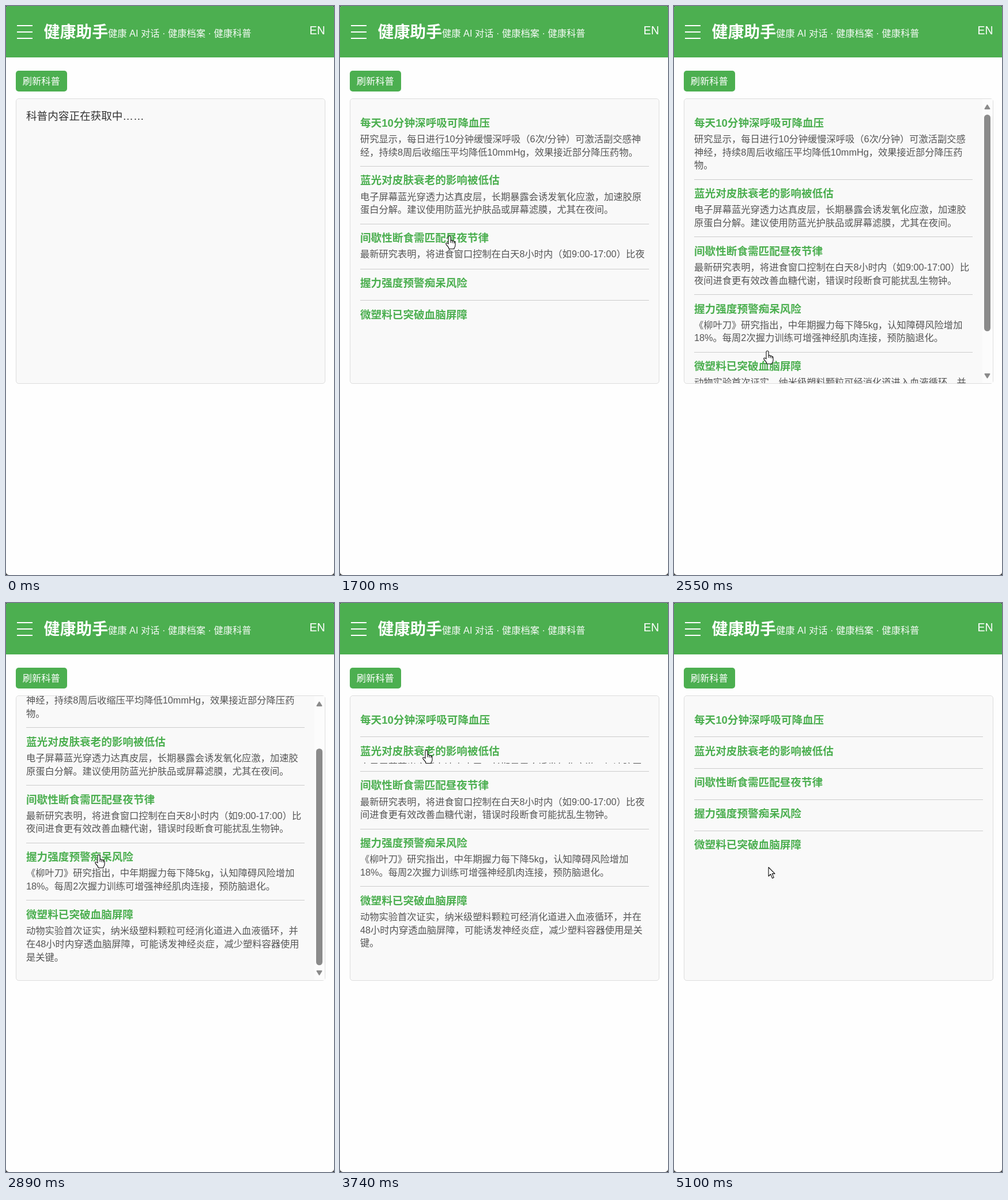
An HTML page that plays this animation: 569x985 px, repeating every 5.44 s.

```html
<!DOCTYPE html>
<html lang="zh-CN">
<head>
<meta charset="utf-8">
<title>健康助手</title>
<style>
html, body { margin: 0; width: 100%; height: 100%; overflow: hidden; background: #333; }
body {
  font: 16.27px/1.4 "Liberation Sans", "Noto Sans CJK SC", "Noto Sans CJK", sans-serif;
  text-spacing-trim: space-all;
  text-autospace: no-autospace;
}
#app { position: absolute; left: 0; top: 0; width: 569px; height: 985px; background: #fefefe; border-radius: 4px 4px 5px 5px; overflow: hidden; }
#app > *, #view > *, .bar, #head > * { position: absolute; white-space: nowrap; }
#head { left: 0; top: 0; width: 569px; height: 89px; background: #4caf50; color: #fff; }
.line { left: 19px; width: 27px; height: 2.6px; background: #fff; }
#name { left: 65.5px; top: 25.5px; font-size: 27.9px; font-weight: bold; }
#sub { left: 177px; top: 36px; opacity: .95; }
#lang { left: 526.5px; top: 29px; font-size: 19.5px; }
#btn { left: 16.5px; top: 112px; width: 89.5px; height: 36px; line-height: 36px; border-radius: 5px; background: #4caf50; color: #fff; text-align: center; }
#box { left: 16.5px; top: 160px; width: 537px; height: 494px; box-sizing: border-box; border: 1px solid #ddd; border-radius: 5px; background: #f9f9f9; }
#view { left: 17px; top: 161px; width: 536px; height: 492px; overflow: hidden; }
#wait { left: 18px; top: 16.500px; font-size: 18.6px; color: #333; }
#list { left: 18px; }
.item { padding: 11.5px 0 12.5px; border-bottom: 1px solid #ccc; }
.item:last-child { border: 0; }
.title { height: 26.04px; font-size: 18.6px; font-weight: bold; color: #4caf50; }
.text { margin-top: 3.1px; overflow: hidden; white-space: normal; color: #555; }
#scroll { right: 0; top: 0; width: 18px; height: 492px; background: #fcfcfc; }
#thumb { left: 3px; width: 11px; border-radius: 6px; background: #8b8b8b; }
#scroll svg { position: absolute; left: 0; top: 0; }
#cursor { left: 0; top: 0; overflow: visible; }
</style>
</head>
<body>
<div id="app">
  <div id="head">
    <div class="line" style="top:32.700px"></div>
    <div class="line" style="top:43.700px"></div>
    <div class="line" style="top:54.700px"></div>
    <div id="name">健康助手</div>
    <div id="sub">健康 AI 对话 · 健康档案 · 健康科普</div>
    <div id="lang">EN</div>
  </div>
  <div id="btn">刷新科普</div>
  <div id="box"></div>
  <div id="view">
    <div id="wait">科普内容正在获取中……</div>
    <div id="list"></div>
    <div id="scroll">
      <svg width="18" height="492" fill="#8b8b8b" stroke="#8b8b8b" stroke-width="2" stroke-linejoin="round">
        <path d="M4.500 17L8.500 10.500L12.500 17z"/>
        <path d="M4.500 476L8.500 482.500L12.500 476z"/>
      </svg>
      <div class="bar" id="thumb"></div>
    </div>
  </div>
  <svg id="cursor" width="1" height="1" fill="#fff" stroke="#111" stroke-width="1.1" stroke-linejoin="round"><path/></svg>
</div>
<script>
const LOOP = 5440, TICK = 170, LINE = 16.27 * 1.4, ROOM = 188.9;
const HAND = 'M-2 14V2a2 2 0 0 1 4 0V8q2.500-1 3 1q2.500-1 3 1q2-.5 2 2v4q0 3-2 5v1.500H-1q0-2.500-3-5.500q-3-3-2-4.500q2-1 4 1.500zM2 8v4M5 9v3.500M8 10v3';
const ARROW = 'M0 0V15.500l3.600-3.500 3 7 2.600-1.200-3-6.700H11z';

// title, text, lines when wide, lines beside the scrollbar, opening time, closing time
const items = [
  ['每天10分钟深呼吸可降血压', '研究显示，每日进行10分钟缓慢深呼吸（6次/分钟）可激活副交感神经，持续8周后收缩压平均降低10mmHg，效果接近部分降压药物。', 2, 3, 600, 3253],
  ['蓝光对皮肤衰老的影响被低估', '电子屏幕蓝光穿透力达真皮层，长期暴露会诱发氧化应激，加速胶原蛋白分解。建议使用防蓝光护肤品或屏幕滤膜，尤其在夜间。', 2, 2, 1110, 3590],
  ['间歇性断食需匹配昼夜节律', '最新研究表明，将进食窗口控制在白天8小时内（如9:00-17:00）比夜间进食更有效改善血糖代谢，错误时段断食可能扰乱生物钟。', 2, 2, 1610, 3760],
  ['握力强度预警痴呆风险', '《柳叶刀》研究指出，中年期握力每下降5kg，认知障碍风险增加18%。每周2次握力训练可增强神经肌肉连接，预防脑退化。', 2, 2, 1950, 4250],
  ['微塑料已突破血脑屏障', '动物实验首次证实，纳米级塑料颗粒可经消化道进入血液循环，并在48小时内穿透血脑屏障，可能诱发神经炎症，减少塑料容器使用是关键。', 3, 3, 2300, 4760]
].map(([title, text, wide, narrow, open, close]) => ({ title, text, wide, narrow, open, close }));

// time, x, y of the pointer tip
const path = [
  [680, 209, 203], [850, 209, 205], [1020, 210, 277], [1190, 206, 300], [1530, 206, 300],
  [1700, 190, 398], [1870, 184, 403], [2040, 170, 499], [2210, 162, 597], [2550, 162, 597],
  [2890, 161, 436], [3060, 157, 207], [3400, 157, 207], [3570, 154, 235], [3740, 150, 255],
  [3910, 147, 305], [4080, 144, 363], [4250, 144, 363], [4420, 146, 385], [4590, 146, 385],
  [4760, 149, 414], [4930, 152, 420], [5100, 164, 457.5]
];
const scrolls = [[2550, 0], [2890, 1], [3060, 0]];

const $ = id => document.getElementById(id);
const clamp = v => Math.max(0, Math.min(1, v));

function add(parent, name, text = '') {
  const el = document.createElement('div');
  el.className = name;
  el.textContent = text;
  return parent.appendChild(el);
}

function along(keys, t, col) {
  const i = keys.findIndex(k => k[0] >= t);
  if (i < 0) return keys[keys.length - 1][col];
  if (i === 0) return keys[0][col];
  const a = keys[i - 1], b = keys[i];
  return a[col] + (b[col] - a[col]) * (t - a[0]) / (b[0] - a[0]);
}

for (const it of items) {
  const el = add($('list'), 'item');
  add(el, 'title', it.title);
  it.el = add(el, 'text', it.text);
}
const pointer = $('cursor').firstChild;

function draw(t) {
  const ready = t >= 340;
  $('wait').style.display = ready ? 'none' : '';
  $('list').style.display = ready ? '' : 'none';

  const shown = items.map(it => clamp((t - it.open) / TICK) - clamp((t - it.close) / TICK));
  const total = key => items.reduce((sum, it, i) => sum + it[key] * LINE * shown[i], 0);
  const over = total('wide') > ROOM;
  const key = over ? 'narrow' : 'wide';
  const max = over ? total(key) - ROOM : 0;
  const top = max * along(scrolls, t, 1);
  items.forEach((it, i) => it.el.style.height = it[key] * LINE * shown[i] + 'px');
  $('list').style.width = (over ? 483 : 501) + 'px';
  $('list').style.top = 17.3 - top + 'px';

  $('scroll').style.display = over ? '' : 'none';
  const scale = 439 / (492 + max);
  $('thumb').style.top = 27 + top * scale + 'px';
  $('thumb').style.height = 492 * scale + 'px';

  $('cursor').style.display = t < 680 ? 'none' : '';
  pointer.setAttribute('d', t < 5100 ? HAND : ARROW);
  pointer.setAttribute('transform', `translate(${along(path, t, 1)} ${along(path, t, 2)})`);
}

const start = performance.now();
function frame() {
  const t = (performance.now() - start) % LOOP;
  draw(Math.floor(t / TICK) * TICK);
  requestAnimationFrame(frame);
}
frame();
</script>
</body>
</html>
```
